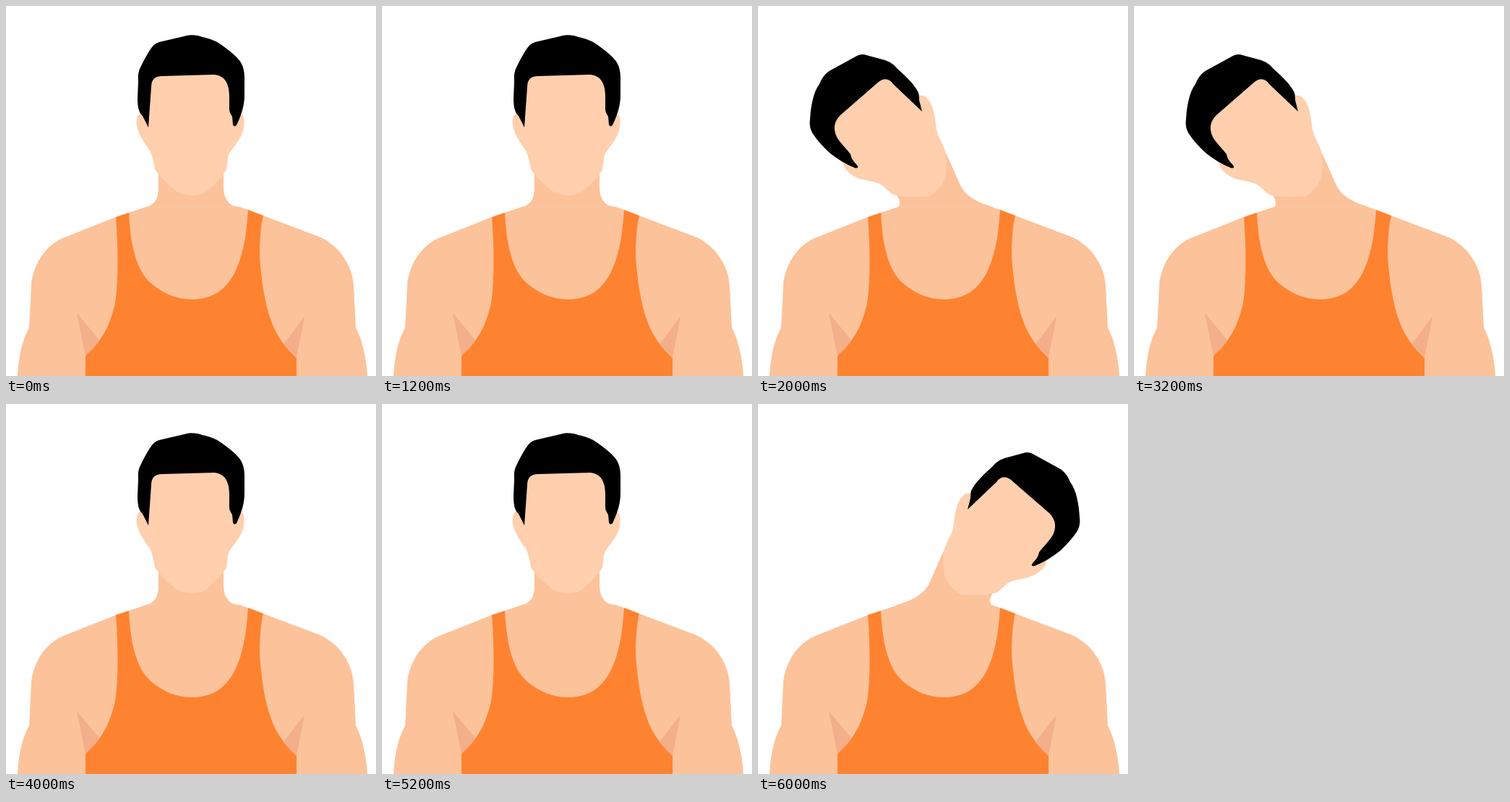
Write an HTML page that moves like this. It is 512 by 512 pixels and loops after 8000 ms.

```html
<!DOCTYPE html>
<html lang="en">
<head>
<meta charset="utf-8">
<title>Neck stretch</title>
<style>
  html, body { margin: 0; width: 100%; height: 100%; overflow: hidden; background: #fff; }
  svg { display: block; width: 100vw; height: 100vh; }
  .skin { fill: #fcc29a; }
  .face { fill: #ffcfae; }
  .shade { fill: #f3ae8a; }
  .top { fill: #fe8330; }
  .seam { stroke: #fdccaa; stroke-width: .8; }
  .pose { opacity: 0; }
  #upright { opacity: 1; }
</style>
</head>
<body>
<svg viewBox="0 0 512 512">
  <defs>
    <g id="tilt">
      <path class="skin" d="M260 203L280 248C287 263 304 272 325 278L325 280H190L194 278C197 275 197 270 192 261L200 240Z"/>
      <path class="face" d="M224 124C233 122 240 133 243 146C246 158 246 170 249 178C253 188 259 196 260 206C262 218 261 228 258 240C254 250 245 259 236 264L206 264C198 264 192 262 187 261C180 256 176 251 170 247C158 241 142 242 132 235C125 230 120 226 118 219L100 160L180 95Z"/>
      <path d="M227 146L187 108C182 100 174 99 167 105L114 151C104 161 104 172 110 183C116 192 122 197 128 205C129 211 132 215 136 219C140 223 138 225 134 224C122 219 110 212 100 204C90 195 82 186 76 177C72 170 71 164 72 157C73 140 76 120 85 108C89 98 95 91 104 87L135 70C140 67 145 66 150 68L176 75C184 78 188 81 193 87C203 96 215 107 221 118C224 123 222 128 224 134Z"/>
    </g>
  </defs>

  <g id="body">
    <path class="skin" d="M16 512C17 488 22 463 32 445L35 386C37 360 53 332 79 321L152 292L170 286L194 278H323L335 282L356 290L435 320C463 333 479 360 481 386L484 445C493 462 499 488 500 512Z"/>
    <path class="shade" d="M98 425L129 462C124 470 117 478 110 484ZM413 430L384 468C390 475 396 482 402 487Z"/>
    <path class="top" d="M152 292L170 286C172 330 180 366 201 384C218 399 238 406 257 406C280 406 300 398 315 372C328 348 333 315 335 282L356 290C352 305 351 330 351 346C354 390 361 430 376 455C383 468 393 479 402 487V512H110V484C128 468 143 448 151 411C156 380 155 330 152 292Z"/>
  </g>

  <g id="upright" class="pose">
    <path class="skin" d="M211 225V250C211 268 205 275 194 278L190 280H325V278C309 278 301 268 301 250V225Z"/>
    <path class="face" d="M197 150L186 149C181 150 180 158 181 166C184 180 192 190 199 200C203 208 204 216 206 226C212 236 222 244 234 255C241 260 250 262 258 262C267 262 273 260 279 255C289 246 299 238 305 226C307 218 306 209 309 204C318 190 327 182 329 168C330 160 330 151 326 150H314L309 94H200Z"/>
    <path d="M197 168L189 152C184 148 182 140 182 128L183 104C183 100 182 95 185 87C191 75 197 63 202 57C206 52 210 50 216 49L246 42C254 39 266 40 272 43C282 45 290 48 297 53C307 60 316 67 322 74C328 81 330 90 330 99V123C330 138 326 150 319 165C317 167 315 167 314 164L313 153C310 148 309 146 309 142V125C309 105 301 95 286 95L216 97C206 97 201 102 201 112Z"/>
  </g>
  <use id="left" class="pose" href="#tilt"/>
  <use id="right" class="pose" href="#tilt" transform="translate(517) scale(-1 1)"/>
  <path class="seam" d="M197 278H320"/>
</svg>
<script>
  const HOLD = 2000;
  const order = ['upright', 'left', 'upright', 'right'];

  for (const id of new Set(order)) {
    const frames = [...order, order[0]].map((pose, i) => ({
      opacity: pose === id ? 1 : 0,
      offset: i / order.length,
      easing: 'steps(1, end)'
    }));
    document.getElementById(id).animate(frames, {
      duration: HOLD * order.length,
      iterations: Infinity
    });
  }
</script>
</body>
</html>
```
